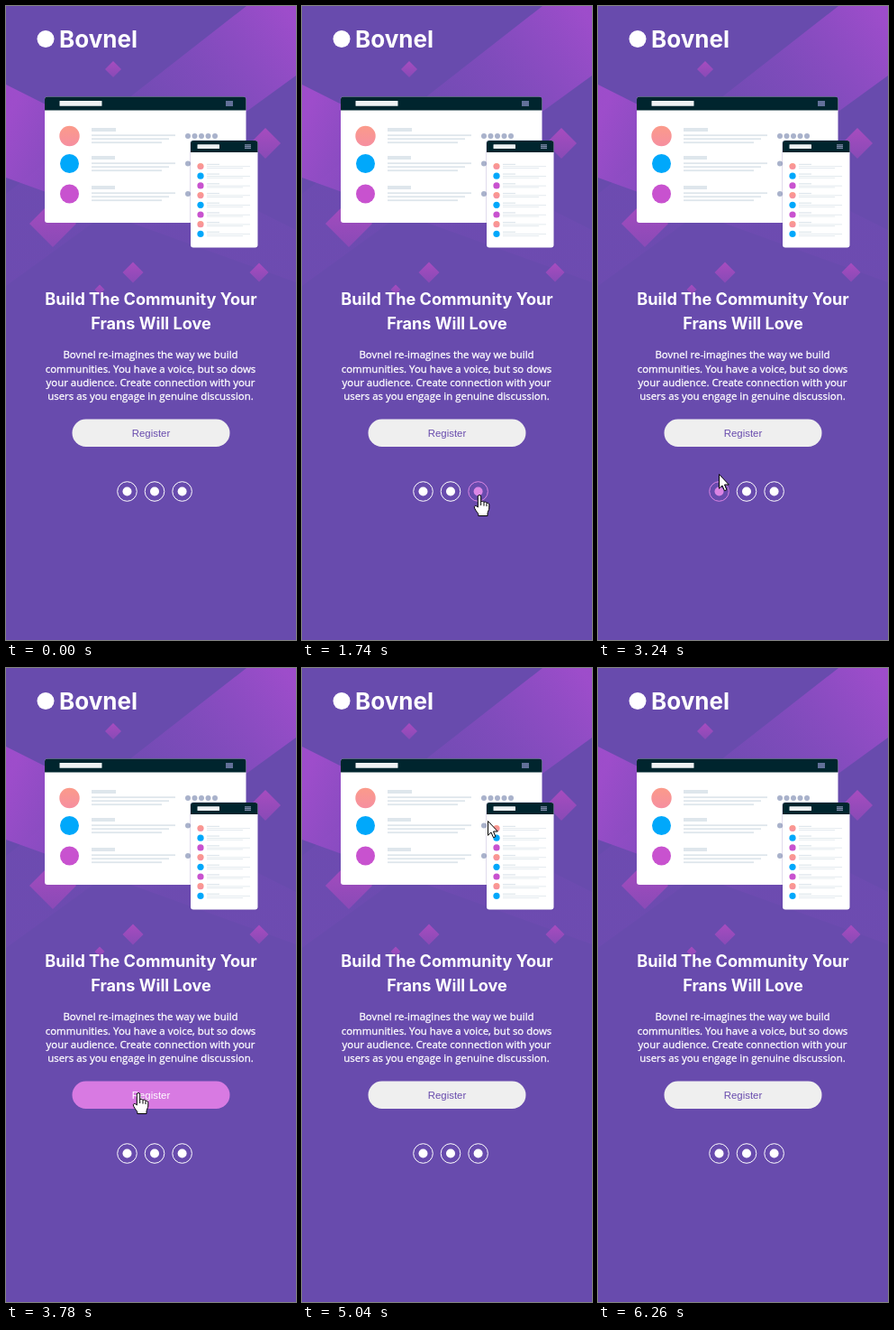
Write an HTML page that moves like this. It is 322 by 702 pixels and loops after 6570 ms.

```html
<!DOCTYPE html>
<html lang="en">
<head>
<meta charset="utf-8">
<title>Community landing page</title>
<style>
  html, body { margin: 0; width: 100%; height: 100%; overflow: hidden; background: #684bad; }
  svg { display: block; width: 100vw; height: 100vh; }
  .brand, .title { font-family: Inter, "Open Sans", sans-serif; font-weight: 700; fill: #fff; }
  .brand { font-size: 26px; }
  .title { font-size: 18.1px; text-anchor: middle; }
  .copy { font: 11.45px "Open Sans", "Noto Sans", sans-serif; fill: #fff; stroke: #fff; stroke-width: .3; text-anchor: middle; }
  .label { font: 11.4px "Liberation Sans", Arial, sans-serif; text-anchor: middle; }
</style>
</head>
<body>
<svg viewBox="0 0 322 702" preserveAspectRatio="none">
  <defs>
    <linearGradient id="beamA" gradientUnits="userSpaceOnUse" x1="322" y1="20" x2="130" y2="165">
      <stop offset="0" stop-color="#a04dcc" stop-opacity=".95"/>
      <stop offset=".5" stop-color="#944cc8" stop-opacity=".5"/>
      <stop offset="1" stop-color="#8a4cc4" stop-opacity=".14"/>
    </linearGradient>
    <linearGradient id="beamB" gradientUnits="userSpaceOnUse" x1="0" y1="130" x2="190" y2="215">
      <stop offset="0" stop-color="#a04dcc" stop-opacity=".95"/>
      <stop offset=".5" stop-color="#944cc8" stop-opacity=".5"/>
      <stop offset="1" stop-color="#8a4cc4" stop-opacity=".14"/>
    </linearGradient>
    <linearGradient id="gem" x1="0" y1="0" x2="0" y2="1">
      <stop offset="0" stop-color="#b24cc2"/>
      <stop offset="1" stop-color="#8e4ab8"/>
    </linearGradient>
    <linearGradient id="salmon" x2="0" y2="1">
      <stop offset="0" stop-color="#fb9a8a"/>
      <stop offset="1" stop-color="#f68fa0"/>
    </linearGradient>
  </defs>

  <rect width="322" height="702" fill="#684bad"/>
  <path d="M267 0H322V77L0 310V208Z" fill="url(#beamA)"/>
  <path d="M0 87L322 248V306L0 190Z" fill="url(#beamB)"/>
  <g id="gems" fill="url(#gem)"></g>

  <circle cx="44" cy="36.5" r="9.5" fill="#fff"/>
  <text class="brand" x="59" y="45.5">Bovnel</text>

  <g id="panels"></g>

  <text class="title" x="161" y="331">Build The Community Your</text>
  <text class="title" x="161" y="358">Frans Will Love</text>
  <g class="copy">
    <text x="160.5" y="390">Bovnel re-imagines the way we build</text>
    <text x="160.5" y="405.5">communities. You have a voice, but so dows</text>
    <text x="160.5" y="420.8">your audience. Create connection with your</text>
    <text x="160.5" y="436">users as you engage in genuine discussion.</text>
  </g>

  <rect id="button" x="73.5" y="457.5" width="175" height="30.5" rx="15.25"/>
  <text id="label" class="label" x="161" y="477">Register</text>
  <g id="socials"></g>

  <g id="cursor" stroke="#000" stroke-linejoin="round">
    <path id="arrow" fill="#fff" d="M.5.5V16.3L4 13l2.5 5.7 2.4-1L6.5 12h4.8Z"/>
    <g id="hand" fill="#fff">
      <path d="M-1.7 14V2.2a1.7 1.7 0 0 1 3.4 0V8c.6-1 3-.8 3.3.6.8-.9 2.8-.6 3 .8 1-.6 2.8 0 2.8 1.8V15c0 2-1.8 4-1.8 6V23.5H-1.2V21.5C-2.4 19.5-5.6 16-5.6 13.8c0-1.6 2-2 3.9.2Z"/>
      <path d="M1.7 8v4M5 8.6v4M8 9.4v3.6" fill="none"/>
    </g>
    <path id="beam" fill="none" d="M-3-8h2l1 1 1-1h2M0-7V7M-3 8h2l1-1 1 1h2"/>
  </g>
</svg>

<script>
const LOOP = 6570, FADE = 300;
const $ = id => document.getElementById(id);

function add(parent, tag, attrs) {
  const el = document.createElementNS('http://www.w3.org/2000/svg', tag);
  for (const key in attrs) el.setAttribute(key, attrs[key]);
  return parent.appendChild(el);
}
const panels = $('panels');
const box = (x, y, width, height, fill, rx = 0) =>
  add(panels, 'rect', { x, y, width, height, fill, rx });
const dot = (cx, cy, r, fill) => add(panels, 'circle', { cx, cy, r, fill });

const colors = ['url(#salmon)', '#00a8fb', '#c852cf'];
const NAVY = '#00252e', LINE = '#dee6ec', SLATE = '#627099';

function panel(x, y, w, h, head) {
  box(x, y, w, h, '#fff', 3);
  add(panels, 'path', {
    d: `M${x} ${y + head}v${3 - head}q0-3 3-3h${w - 6}q3 0 3 3v${head - 3}Z`, fill: NAVY
  });
}

function buildScene() {
  const gems = [[119, 70, 9], [288, 152, 17], [52, 241, 26], [141, 295, 11.5], [281, 295, 10.5], [104, 314, 5.5]];
  for (const [x, y, r] of gems)
    add($('gems'), 'path', { d: `M${x} ${y - r}l${r} ${r}l${-r} ${r}l${-r} ${-r}Z`, opacity: .85 });

  panel(43, 100.5, 223.5, 139.5, 15);
  box(59.5, 105, 47, 5.8, '#eef1f3', .5);
  box(244, 105, 8, 6, SLATE);
  [144, 174.5, 208].forEach((y, i) => {
    const top = [135, 166, 199][i];
    dot(70.5, y, i ? 10.5 : 11.2, colors[i]);
    box(95, top, i ? 26 : 27, 4, LINE);
    [93, 86, 78].forEach((w, k) => box(95, top + 7.3 + k * 4, w, 1.8, LINE));
    for (let k = 0; k < (i ? 1 : 5); k++) dot(202 + 7.5 * k, y, 3, '#a9b2cb');
  });

  box(204.3, 148.5, 76, 119.8, '#553f98', 3.5).setAttribute('opacity', .25);
  panel(205, 149, 74.5, 118.5, 13);
  box(212.5, 153.3, 24.5, 4.7, '#eef1f3', .5);
  for (let k = 0; k < 3; k++) box(265, 153.2 + 1.8 * k, 7, 1.3, '#7d89a8');
  for (let i = 0; i < 8; i++) {
    const y = 177.5 + 10.7 * i;
    dot(216, y, 3.6, colors[i % 3]);
    box(223, y - 2.7, 14, 1.2, LINE);
    box(223, y - .2, 48, .8, LINE);
    box(223, y + 1.6, 40, .8, LINE);
  }
}
buildScene();

// Each button: its centre and the time span in which it is hovered.
const socials = [[134.5, 2700, 3190], [165, 2310, 2640], [195.6, 1500, 2130]].map(([x, from, to]) => ({
  from, to,
  ring: add($('socials'), 'circle', { cx: x, cy: 537.5, r: 10.8, fill: 'none' }),
  mark: add($('socials'), 'circle', { cx: x, cy: 537.5, r: 5 })
}));
const register = { from: 3410, to: 4085 };

// Pointer path: time, x, y.
const path = [
  [640, 287, 700], [960, 250, 622], [1290, 219, 571], [1480, 202, 549], [1620, 197, 541],
  [2060, 197, 541], [2250, 173, 537], [2450, 158, 536], [2590, 158, 536], [2700, 145, 535],
  [2860, 134, 535], [3090, 134, 535], [3240, 134, 518], [3360, 135, 496], [3560, 147, 470],
  [4030, 147, 470], [4140, 158, 448], [4540, 163, 276], [4680, 164, 237], [4960, 190, 163],
  [5340, 276, 249], [5460, 282, 298], [6000, 294, 591], [6260, 295, 702]
];

function slope(i, axis) {
  const a = path[i - 1], b = path[i], c = path[i + 1];
  if (!a || !c) {
    const [p, q] = a ? [a, b] : [b, c];
    return (q[axis] - p[axis]) / (q[0] - p[0]);
  }
  const before = (b[axis] - a[axis]) / (b[0] - a[0]);
  const after = (c[axis] - b[axis]) / (c[0] - b[0]);
  return before * after <= 0 ? 0 : 2 * before * after / (before + after);
}

function pointerAt(t) {
  const i = path.findIndex((p, k) => k && t <= p[0]) - 1;
  const a = path[i], b = path[i + 1], span = b[0] - a[0], u = (t - a[0]) / span;
  return [1, 2].map(axis => {
    const rise = u * u * (3 - 2 * u);
    return a[axis] + (b[axis] - a[axis]) * rise
      + span * u * (1 - u) * ((1 - u) * slope(i, axis) - u * slope(i + 1, axis));
  });
}

const clamp = v => Math.min(1, Math.max(0, v));
const ease = v => v * v * (3 - 2 * v);
const isOver = (item, t) => t >= item.from && t < item.to;
const hoverLevel = (item, t) => ease(Math.min(clamp((t - item.from) / FADE), clamp(1 - (t - item.to) / FADE)));
const mix = (from, to, k) => `rgb(${from.map((v, i) => Math.round(v + (to[i] - v) * k))})`;

const WHITE = [255, 255, 255], PINK = [216, 122, 226], GREY = [239, 239, 239], PURPLE = [104, 75, 173];

function render(t) {
  for (const item of socials) {
    const color = mix(WHITE, PINK, hoverLevel(item, t));
    item.ring.setAttribute('stroke', color);
    item.mark.setAttribute('fill', color);
  }
  const level = hoverLevel(register, t);
  $('button').setAttribute('fill', mix(GREY, PINK, level));
  $('label').setAttribute('fill', mix(PURPLE, WHITE, level));

  const visible = t >= 640 && t < 6260;
  $('cursor').style.display = visible ? '' : 'none';
  if (!visible) return;
  const [x, y] = pointerAt(t);
  const overText = x > 42 && x < 276 && ((y > 312 && y < 366) || (y > 378 && y < 441));
  const shape = [...socials, register].some(item => isOver(item, t)) ? 'hand' : overText ? 'beam' : 'arrow';
  for (const id of ['arrow', 'hand', 'beam']) $(id).style.display = id === shape ? '' : 'none';
  $('cursor').setAttribute('transform', `translate(${Math.round(x)} ${Math.round(y)})`);
}

const start = performance.now();
function tick() {
  render((performance.now() - start) % LOOP);
  requestAnimationFrame(tick);
}
tick();
</script>
</body>
</html>
```
